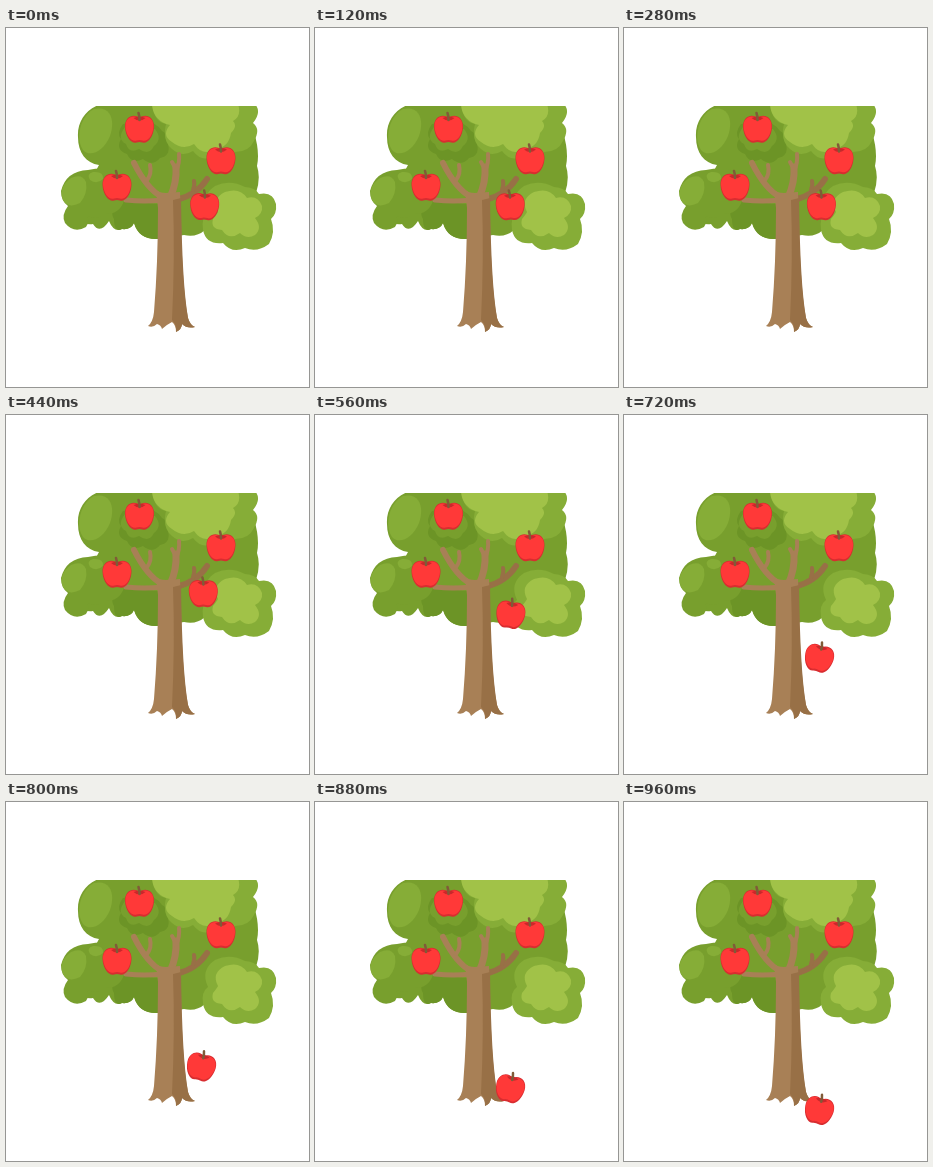
An HTML page with a canvas that plays this animation: 303 by 359 pixels, repeating every 1.6 s.

```html
<!DOCTYPE html>
<html lang="en">
<head>
<meta charset="utf-8">
<title>Falling apple</title>
<style>
html, body { margin: 0; width: 100%; height: 100%; overflow: hidden; background: #fff; }
canvas { display: block; width: 100vw; height: 100vh; }
</style>
</head>
<body>
<canvas id="stage" width="303" height="359"></canvas>
<script>
const ctx = document.getElementById('stage').getContext('2d');
const LOOP = 1600, STEP = 40, DROP = 480, LAND = 960;
const GREEN = { deep: '#6c9426', back: '#789f2d', mid: '#86ad37', light: '#a1c248' };
const BARK = { light: '#a88056', dark: '#987046' };

function fill(color, d) {
  ctx.fillStyle = color;
  ctx.fill(new Path2D(d));
}

function limb(color, width, d) {
  ctx.strokeStyle = color;
  ctx.lineWidth = width;
  ctx.lineCap = 'round';
  ctx.stroke(new Path2D(d));
}

function crown() {
  ctx.save();
  ctx.beginPath();
  ctx.rect(0, 78, 303, 281);
  ctx.clip();
  // main mass
  fill(GREEN.back, `M96 76 C80 80 71 94 72 109 C72 125 80 135 93 137 L86 150 L70 185
    Q76 198 87 196 Q94 207 103 193 Q108 205 116 201 Q125 202 128 195 Q133 212 152 211
    L178 207 Q190 210 199 202 L250 165 Q255 150 251 138 Q254 124 248 104 L240 76 Z`);
  fill(GREEN.mid, 'M88 81 C106 77 109 94 104 108 C98 123 84 130 77 122 C69 111 74 88 88 81 Z');
  // inner shade
  fill(GREEN.deep, `M117 96 Q110 105 115 111 Q109 122 121 126 Q126 137 137 131 Q147 139 154 130
    Q165 128 162 116 Q165 107 156 103 Q149 93 137 93 Z`);
  fill(GREEN.back, 'M119 99 Q110 111 120 116 Q123 126 133 121 Q143 128 148 118 Q157 111 149 101 Z');
  fill(GREEN.deep, `M113 172 Q103 183 108 191 Q108 205 116 201 Q125 202 128 195
    Q133 212 152 211 L152 176 Z`);
  // left cluster
  fill(GREEN.back, `M82 142 Q60 143 55 163 Q55 173 62 178 Q55 187 59 195 Q68 206 80 199
    Q84 193 81 188 Q92 193 98 186 Q113 187 118 173 L116 145 Q103 138 82 142 Z`);
  fill(GREEN.mid, 'M65 150 Q76 145 80 154 Q82 166 74 175 Q62 181 57 172 Q52 159 65 150 Z');
  fill(GREEN.mid, 'M87 144 Q98 143 97 151 Q91 157 84 152 Q80 146 87 144 Z');
  // top right cluster
  fill(GREEN.mid, `M146 76 Q148 94 160 96 Q156 113 166 121 Q176 130 187 123 Q196 135 208 128
    Q220 133 229 124 Q243 124 248 113 Q255 101 247 95 Q256 84 249 76 Z`);
  fill(GREEN.light, `M146 76 Q147 93 164 97 Q155 107 166 114 Q177 123 188 116 Q197 129 210 121
    Q223 119 225 105 Q232 98 227 93 Q236 88 232 76 Z`);
  // right cluster
  fill(GREEN.mid, `M209 158 Q224 151 239 159 Q250 160 253 166 Q267 163 270 176 Q271 186 265 191
    Q270 204 263 216 Q251 225 239 220 Q226 226 217 215 Q200 217 197 202 Q195 190 202 185
    Q194 168 209 158 Z`);
  fill(GREEN.light, `M219 164 Q234 159 241 170 Q252 167 256 178 Q257 186 249 190 Q257 200 249 207
    Q241 212 234 205 Q223 213 216 202 Q204 201 207 191 Q211 186 212 184 Q205 171 219 164 Z`);
  ctx.restore();
}

function trunk() {
  limb(BARK.light, 6, 'M156 169 Q141 161 128 135');
  limb(BARK.light, 4, 'M141 152 Q146 146 144 137');
  limb(BARK.light, 5, 'M156 172 Q139 174 120 172');
  limb(BARK.light, 7, 'M164 170 Q171 154 170 139');
  limb(BARK.light, 4, 'M170 143 Q174 135 173 126 M170 144 Q169 138 166 134');
  limb(BARK.dark, 6, 'M170 172 Q191 167 201 151');
  limb(BARK.dark, 4, 'M187 162 Q189 157 188 153');
  fill(BARK.light, `M150 162 Q153 165 160 165 L174 164 L175 190 Q176 260 182 290 Q184 297 189 299
    Q181 301 176 296 Q176 301 170 304 Q170 297 166 294 Q160 297 156 301 Q155 297 151 296
    Q147 300 142 298 Q147 294 148 284 Q152 235 152 180 Z`);
  fill(BARK.dark, `M167 172 L175 170 Q176 255 182 290 Q184 297 189 299 Q181 301 176 296
    Q176 301 170 304 Q171 297 166 292 Q169 230 167 172 Z`);
}

function apple(x, y, angle = 0) {
  ctx.save();
  ctx.translate(x, y);
  ctx.rotate(angle);
  fill('#d82d30', `M0 -11 C5 -16 15 -13 14.5 -2 C14 8 8 15 3 13.5 Q0 12.5 -3 13.5
    C-8 15 -14 8 -14.5 -2 C-15 -13 -5 -16 0 -11 Z`);
  fill('#ff3938', `M0 -10 C5 -15 14.5 -12 14 -2 C13 7 8 13 3 11.5 Q0 10.5 -3 11.5
    C-8 13 -13 7 -14 -2 C-14.5 -12 -5 -15 0 -10 Z`);
  fill('#c9282b', 'M-6 -11 Q0 -6 6 -11 Q0 -14 -6 -11 Z');
  limb('#805b38', 2.5, 'M0 -9 Q0 -13 -1 -16');
  ctx.restore();
}

function fallingApple(t) {
  if (t < DROP) {
    const sway = 1.8 * Math.exp(-t / 700) * Math.cos(2 * Math.PI * t / 240);
    apple(196.8 + sway, 178.5, sway * 0.02);
    return;
  }
  const p = Math.min(1, (t - DROP) / (LAND - DROP));
  apple(196.5 - 1.5 * Math.min(1, p * 4), 178 + 130.5 * p, 0.25 * Math.min(1, p * 4));
}

function draw(now) {
  const t = Math.floor((now % LOOP) / STEP) * STEP;
  ctx.fillStyle = '#fff';
  ctx.fillRect(0, 0, 303, 359);
  crown();
  trunk();
  apple(133.5, 101);
  apple(111, 159);
  apple(215, 132.5);
  fallingApple(t);
  requestAnimationFrame(draw);
}
requestAnimationFrame(draw);
</script>
</body>
</html>
```
